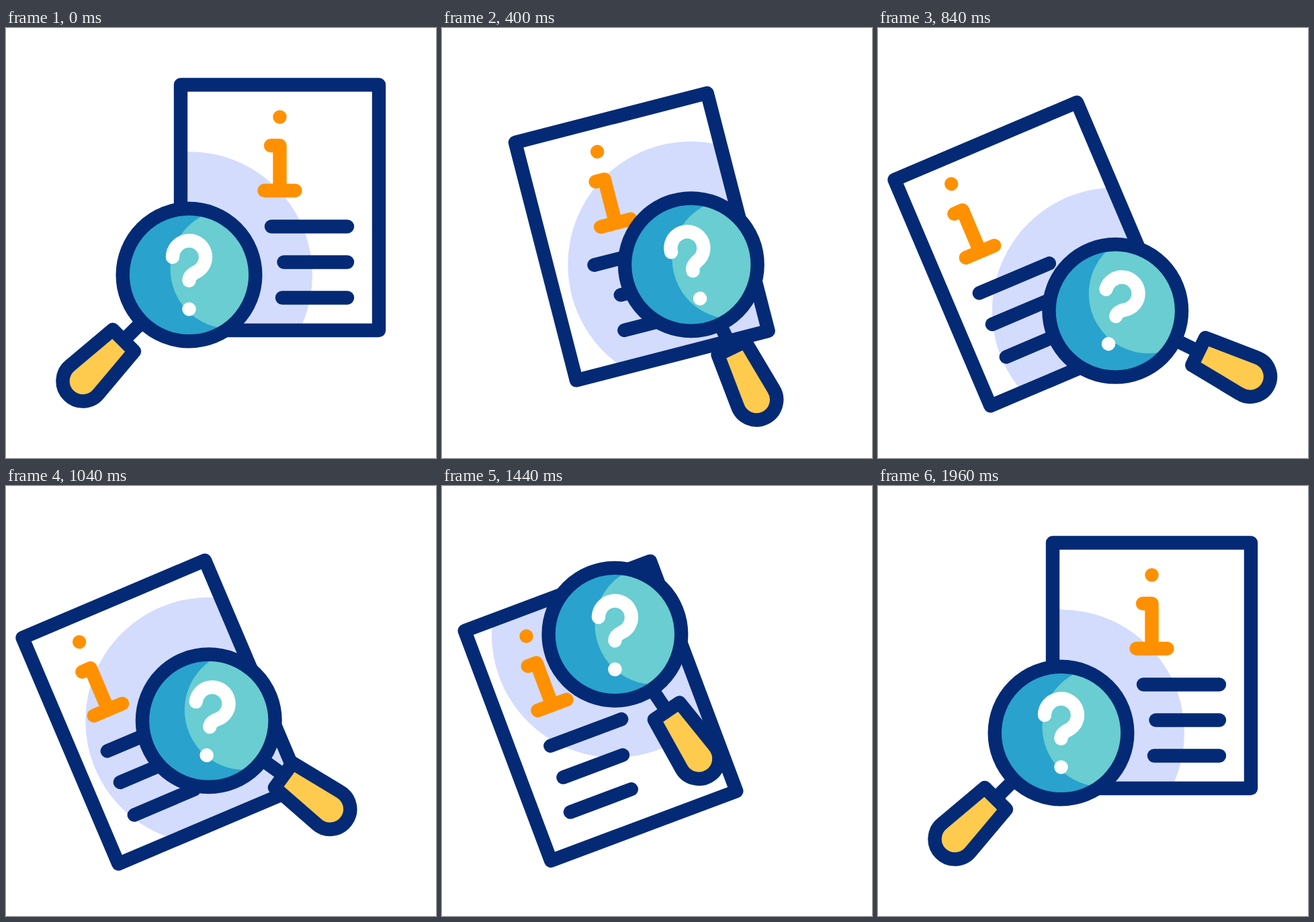
Write an HTML page without scripts that moves like this. It is 640 by 640 pixels and loops after 2 s.

```html
<!DOCTYPE html>
<html lang="en">
<head>
<meta charset="utf-8">
<title>Information search</title>
<style>
  :root {
    --navy: #042a75;
    --orange: #ff9100;
    --ease: cubic-bezier(.333, 0, .667, 1);
  }
  html, body { margin: 0; width: 100%; height: 100%; overflow: hidden; background: #fff; }
  svg { display: block; width: 100%; height: 100%; }

  .page, .info, .line, .lens-x, .lens-y, .handle, .mark, .glow {
    animation: 2s var(--ease) infinite;
  }
  .page { animation-name: page-move, page-turn; }
  .info { animation-name: info; }
  .l1 { animation-name: line1; }
  .l2 { animation-name: line2; }
  .l3 { animation-name: line3; }
  .lens-x { animation-name: lens-x; }
  .lens-y { animation-name: lens-y; }
  .handle { animation-name: handle; }
  .mark { animation-name: mark-turn, mark-move; }
  .glow { animation-name: glow; }

  .stroke { fill: none; stroke: var(--navy); stroke-width: 20.4; stroke-linecap: round; stroke-linejoin: round; }
  .orange { stroke: var(--orange); }
  .white { stroke: #fff; }

  /* sheet */
  @keyframes page-move {
    0%, 6%, 92%, to { translate: 407.5px 267.25px; }
    30%, 70% { translate: 231.7px 336.5px; }
  }
  @keyframes page-turn {
    0%, 6%, 92%, to { rotate: 0deg; }
    30%, 67% { rotate: -23deg; }
  }
  @keyframes info {
    0%, 6%, 92%, to { translate: 0 0; }
    36%, 67% { translate: -72px -9.2px; }
  }
  @keyframes line1 {
    0%, 6%, 92%, to { translate: 0 0; }
    26%, 67% { translate: -84.6px -6.5px; }
  }
  @keyframes line2 {
    0%, 6%, 92%, to { translate: 0 0; }
    32%, 67% { translate: -103.7px -9.2px; }
  }
  @keyframes line3 {
    0%, 6%, 92%, to { translate: 0 0; }
    30%, 70% { translate: -101px -9.3px; }
  }

  /* magnifier: each axis has its own easing, which bends the path */
  @keyframes lens-x {
    0%, 92%, to { translate: 272.5px 0; }
    6% { translate: 272.5px 0; animation-timing-function: cubic-bezier(.333, .03, .667, 1); }
    26% { translate: 396.5px 0; animation-timing-function: cubic-bezier(.5, 0, .8, .6); }
    42% { translate: 353.5px 0; animation-timing-function: cubic-bezier(.3, .45, .6, 1); }
    70% { translate: 257px 0; }
  }
  @keyframes lens-y {
    0%, 92%, to { translate: 0 367.5px; }
    6% { translate: 0 367.5px; animation-timing-function: cubic-bezier(.7, 0, .75, 1); }
    26% { translate: 0 340.5px; animation-timing-function: cubic-bezier(.45, 0, .6, 1); }
    42% { translate: 0 421px; animation-timing-function: cubic-bezier(.333, .13, .667, 1); }
    70% { translate: 0 217px; }
  }
  @keyframes handle {
    0%, 6%, 92%, to { rotate: 45deg; }
    26% { rotate: -45deg; animation-timing-function: cubic-bezier(.45, 0, .6, 1); }
    42% { rotate: -64deg; animation-timing-function: cubic-bezier(.333, .15, .667, 1); }
    70% { rotate: -36deg; }
  }
  @keyframes mark-turn {
    0%, 6%, 60%, 74%, 98%, to { rotate: 0deg; }
    18%, 86% { rotate: -15deg; }
    42% { rotate: 15deg; }
  }
  @keyframes mark-move {
    0%, 12%, 92%, to { translate: 0 0; }
    28% { translate: 1.3px 2px; }
    42% { translate: 3px 0; }
    60% { translate: 2px 1.5px; }
    80% { translate: -1px 1px; }
  }
  @keyframes glow {
    0%, 6%, 98%, to { translate: 61px -9px; }
    12% { translate: 61.5px -11px; }
    28% { translate: 60px -6px; }
    42% { translate: 49.5px -25.5px; }
    60% { translate: 55.5px -9px; }
    80% { translate: 61px -17px; }
  }
</style>
</head>
<body>
<svg viewBox="0 0 640 640">
  <defs>
    <clipPath id="sheet"><rect class="page" x="-147.5" y="-182.75" width="295" height="365.5"/></clipPath>
    <clipPath id="glass"><circle r="92"/></clipPath>
  </defs>

  <g clip-path="url(#sheet)">
    <g class="lens-x"><g class="lens-y"><circle r="183.5" fill="#d3dcfd"/></g></g>
  </g>

  <g class="page">
    <rect class="stroke" x="-147.5" y="-182.75" width="295" height="365.5"/>
    <g class="info">
      <circle cy="-134.75" r="10.2" fill="var(--orange)"/>
      <path class="stroke orange" d="M-13.5-92.25H0V-25.25M-23-25.25H23"/>
    </g>
    <path class="stroke line l1" d="M-12.5 28.25H100.5"/>
    <path class="stroke line l2" d="M6 81.25H100.5"/>
    <path class="stroke line l3" d="M3.5 134.25H100.5"/>
  </g>

  <g class="lens-x"><g class="lens-y">
    <g class="handle">
      <path d="M0 100V138" stroke="var(--navy)" stroke-width="20.4"/>
      <path class="stroke" style="fill:#ffcb4f" d="M-22.7 138H22.7L29.8 220A30 30 0 1 1-29.8 220Z"/>
    </g>
    <circle r="98.8" fill="#29a2cd"/>
    <g clip-path="url(#glass)"><circle class="glow" r="89" fill="#69cdd1"/></g>
    <circle class="stroke" r="98.8"/>
    <g class="mark">
      <path class="stroke white" d="M-24.5-26.5A24.5 24.5 0 1 1 10.5-4.3C4-1 0 3.5 0 8.5"/>
      <circle cy="51" r="10.3" fill="#fff"/>
    </g>
  </g></g>
</svg>
</body>
</html>
```
